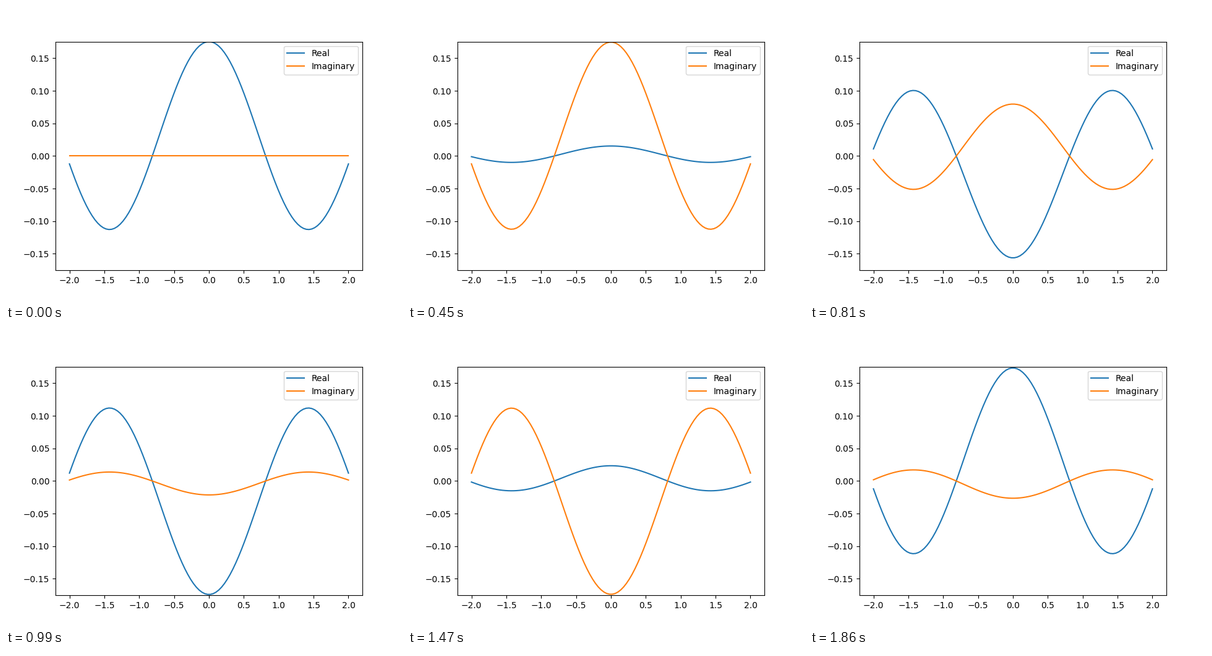
Write a matplotlib script that moves like this. It is 640 px wide and 480 px high and loops after 1.89 s.

```python
import numpy as np
import matplotlib.pyplot as plt
from matplotlib.animation import FuncAnimation

FRAMES = 63
INTERVAL = 30         # ms
PHASE_STEP = 0.0989   # radians per frame
PEAK = 0.1754

# Stationary wave whose complex phase turns at a constant rate
x = np.linspace(-2, 2, 100)
psi = 0.1441 * np.cos(2.203 * x) + 0.0313

fig, ax = plt.subplots(figsize=(6.4, 4.8), dpi=100)
real, = ax.plot(x, psi, label="Real")
imag, = ax.plot(x, 0 * psi, label="Imaginary")
ax.set_xlim(-2.2, 2.2)
ax.set_ylim(-PEAK, PEAK)
ax.legend(loc="upper right")


def update(i):
    wave = psi * np.exp(1j * PHASE_STEP * i)
    real.set_ydata(wave.real)
    imag.set_ydata(wave.imag)
    return real, imag


anim = FuncAnimation(fig, update, frames=FRAMES, interval=INTERVAL,
                     repeat=True, repeat_delay=0)
plt.show()
```
